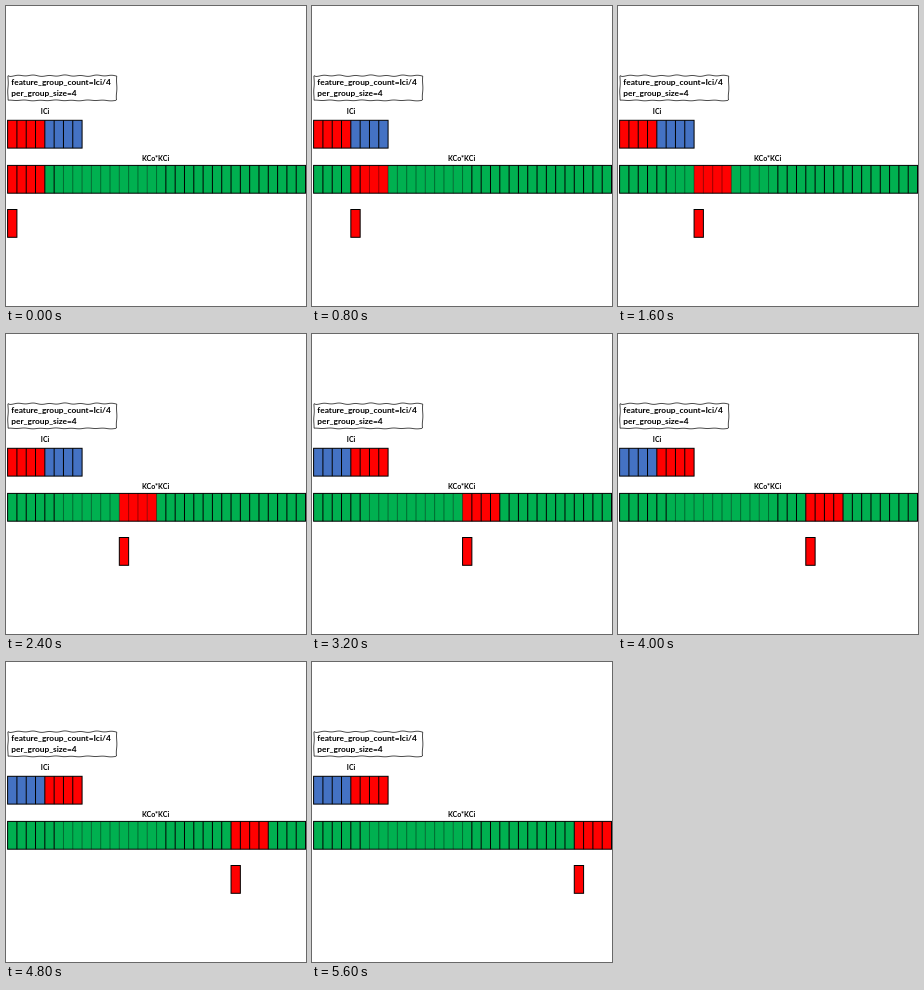
An HTML page with a canvas for the animation above (6400 ms loop, 300 by 300 pixels).

```html
<!DOCTYPE html>
<html>
<head>
<meta charset="utf-8">
<style>
  html, body { margin: 0; height: 100%; overflow: hidden; background: #fff; }
  canvas { display: block; }
</style>
</head>
<body>
<canvas id="stage" width="300" height="300"></canvas>
<script>
const ctx = document.getElementById("stage").getContext("2d");
const RED = "#ff0000", BLUE = "#4472c4", GREEN = "#00b050";
const STEP_MS = 800, STEPS = 8, GROUP = 4, CELL_W = 9.31, CELL_H = 27.8;

const edge = i => 1.6 + CELL_W * i;
const isFaint = i => i > 5 && i < 17;

function drawRow(y, first, count, colorOf, faint = () => false) {
  const left = edge(first), width = CELL_W * count;
  for (let i = first; i < first + count; i++) {
    // Overlap to the right so that no seam shows between cells.
    ctx.fillStyle = colorOf(i);
    ctx.fillRect(edge(i), y, Math.min(CELL_W + 0.5, left + width - edge(i)), CELL_H);
  }
  ctx.lineWidth = 1;
  for (let i = first + 1; i < first + count; i++) {
    ctx.strokeStyle = faint(i) ? "rgba(0,0,0,.4)" : "#000";
    ctx.beginPath();
    ctx.moveTo(edge(i), y);
    ctx.lineTo(edge(i), y + CELL_H);
    ctx.stroke();
  }
  ctx.strokeStyle = "#000";
  ctx.strokeRect(left, y, width, CELL_H);
}

function drawText(text, x, y, size) {
  ctx.font = `bold ${size}px Lato, sans-serif`;
  ctx.fillStyle = "#000";
  ctx.fillText(text, x, y);
}

// Hand-drawn looking frame: each side wavers slightly.
function drawNote() {
  const wobble = t => 0.5 * Math.sin(t * 0.4) + 0.3 * Math.sin(t * 0.17 + 1);
  ctx.beginPath();
  ctx.moveTo(2, 69.7);
  for (let x = 4; x <= 110; x += 2) ctx.lineTo(x, 69.7 + wobble(x));
  for (let y = 70; y <= 94; y += 2) ctx.lineTo(110.6 + wobble(y) * 0.4, y);
  for (let x = 110; x >= 2; x -= 2) ctx.lineTo(x, 94.4 + wobble(x + 9) * 0.6);
  for (let y = 94; y >= 70; y -= 2) ctx.lineTo(2 + wobble(y + 5) * 0.4, y);
  ctx.closePath();
  ctx.strokeStyle = "#000";
  ctx.lineWidth = 0.7;
  ctx.stroke();
  drawText("feature_group_count=Ici/4", 5.3, 79, 8.35);
  drawText("per_group_size=4", 5.3, 90, 8.35);
}

function draw(now) {
  const step = Math.floor(now / STEP_MS) % STEPS;
  const start = step * GROUP;
  const half = Math.floor(step / 4);
  ctx.fillStyle = "#fff";
  ctx.fillRect(0, 0, 300, 300);

  drawNote();
  drawText("ICi", 34.8, 108, 7);
  drawRow(114.3, 0, 8, i => Math.floor(i / GROUP) === half ? RED : BLUE);
  drawText("KCo*KCi", 136, 155, 7.1);
  drawRow(159.4, 0, 32, i => i >= start && i < start + GROUP ? RED : GREEN, isFaint);
  drawRow(203.5, start, 1, () => RED);
}

const origin = performance.now();
function tick() {
  draw(performance.now() - origin);
  requestAnimationFrame(tick);
}
tick();
</script>
</body>
</html>
```
